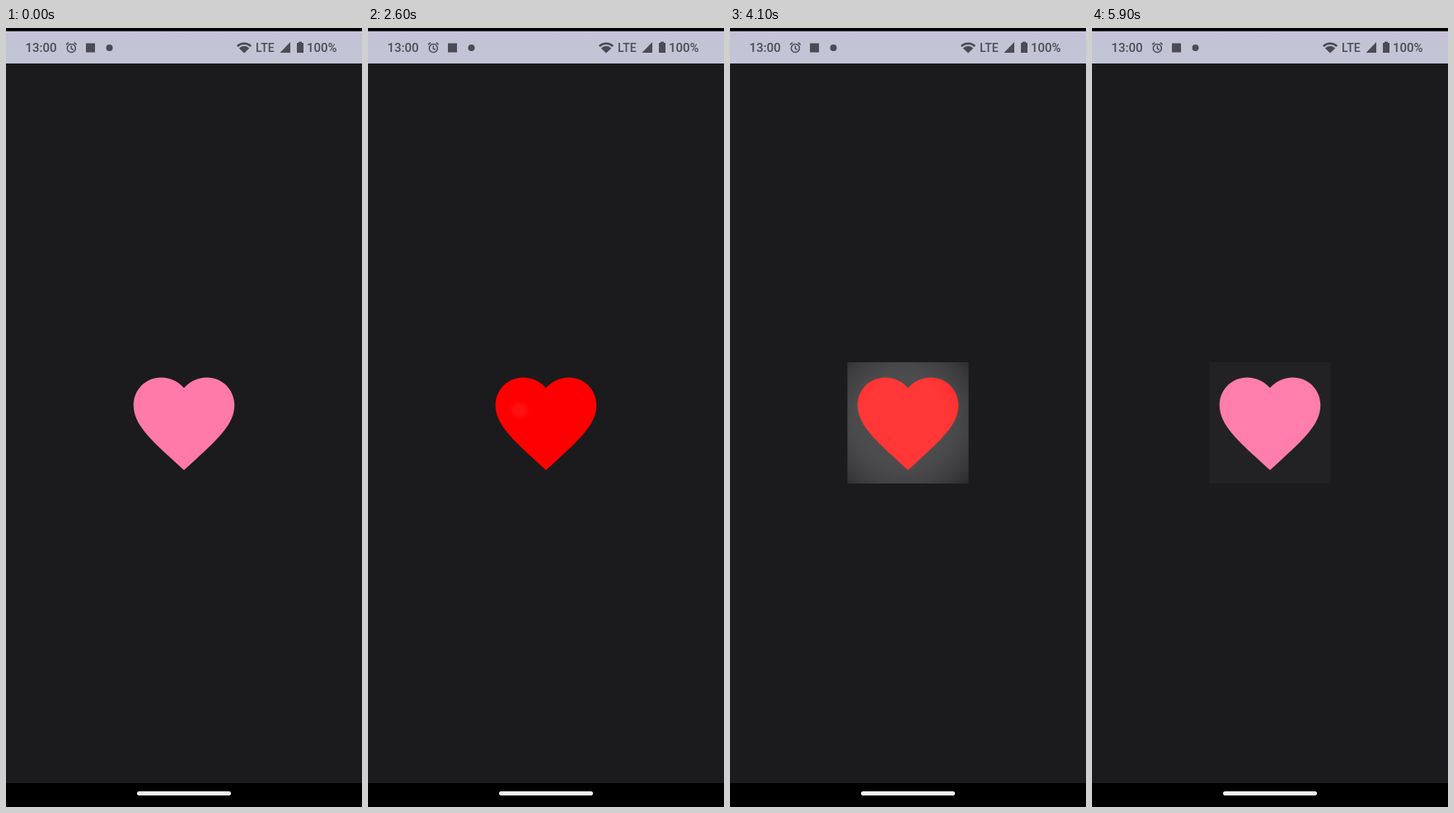
Recreate the animation shown at these times as an HTML page with a canvas. Size 432 by 944 pixels, loop 6000 ms.

```html
<!DOCTYPE html>
<html lang="en">
<head>
<meta charset="utf-8">
<title>Heart toggle</title>
<style>
  html, body { margin: 0; width: 100%; height: 100%; overflow: hidden; background: #000; }
  canvas { display: block; }
</style>
</head>
<body>
<canvas id="stage" width="432" height="944"></canvas>
<script>
const ctx = document.getElementById('stage').getContext('2d');
const LOOP = 6000, STEP = 100;
const PINK = '#ff7aa8', RED = '#ff0000', INK = '#4c4a55';

const BOX = { x: 142.5, y: 405, size: 147 };
const CENTER = { x: 216, y: 478.5 };
const ENTER = 450, EXIT = 375, RELEASE = 100;
const MAX_RADIUS = 240, MAX_ALPHA = 0.22;

const heart = new Path2D('M12 21.35l-1.45-1.32C5.4 15.36 2 12.28 2 8.5 2 5.42 4.42 3 7.5 3c1.74 0 3.41.81 4.5 2.09C13.09 3.81 14.76 3 16.5 3 19.58 3 22 5.42 22 8.5c0 3.78-3.4 6.86-8.55 11.54L12 21.35z');

const taps = [
  { time: 1062, x: 185, y: 462, color: RED },
  { time: 2528, x: 181, y: 462, color: PINK },
  { time: 3855, x: 185, y: 462, color: RED },
  { time: 5142, x: 187, y: 461, color: PINK },
];

const clamp = v => Math.min(1, Math.max(0, v));
const mix = (a, b, k) => a + (b - a) * k;

// Fast-out-slow-in: cubic-bezier(.4, 0, .2, 1)
function ease(x) {
  let lo = 0, hi = 1;
  for (let i = 0; i < 20; i++) {
    const s = (lo + hi) / 2, r = 1 - s;
    if (1.2 * r * r * s + 0.6 * r * s * s + s * s * s < x) lo = s; else hi = s;
  }
  return 3 * (1 - lo) * lo * lo + lo ** 3;
}

function rect(x, y, w, h, fill) {
  ctx.fillStyle = fill;
  ctx.fillRect(x, y, w, h);
}

function disc(x, y, r) {
  ctx.beginPath();
  ctx.arc(x, y, r, 0, 7);
  ctx.fill();
}

function lines(...paths) {
  ctx.beginPath();
  for (const [x, y, ...rest] of paths) {
    ctx.moveTo(x, y);
    for (let i = 0; i < rest.length; i += 2) ctx.lineTo(rest[i], rest[i + 1]);
  }
}

function label(text, x, size) {
  ctx.font = `500 ${size}px Roboto, sans-serif`;
  ctx.fillText(text, x, 28.7);
}

function drawStatusBar() {
  const tint = ctx.createLinearGradient(0, 4, 0, 43);
  tint.addColorStop(0, '#c8c0dc');
  tint.addColorStop(0.3, '#c3c3d6');
  tint.addColorStop(1, '#c2c5d5');
  rect(0, 4, 432, 39, tint);

  ctx.fillStyle = ctx.strokeStyle = INK;
  label('13:00', 23.5, 15);
  label('LTE', 303, 14);
  label('100%', 365, 15);

  // Alarm clock
  ctx.lineWidth = 1.5;
  ctx.beginPath();
  ctx.arc(79.3, 24.5, 5, 0, 7);
  ctx.stroke();
  lines([79.3, 21.5, 79.3, 25, 81.7, 26.3], [73, 20.2, 76, 17.7], [82.6, 17.7, 85.6, 20.2]);
  ctx.stroke();

  // Notification markers
  ctx.fillRect(97, 18.5, 11, 11);
  disc(125.5, 24, 4);

  // Wi-Fi
  const from = -Math.PI * 0.75, to = -Math.PI * 0.25;
  ctx.lineWidth = 2.6;
  ctx.beginPath();
  ctx.arc(289, 30.3, 11.6, from, to);
  ctx.stroke();
  ctx.beginPath();
  ctx.moveTo(289, 30.6);
  ctx.arc(289, 30.6, 8.8, from, to);
  ctx.fill();

  // Signal and battery
  lines([332.5, 30, 345, 30, 345, 17]);
  ctx.fill();
  ctx.fillRect(353, 18, 8, 12);
  ctx.fillRect(355, 16.6, 4, 2);
}

function drawHeart(color) {
  ctx.save();
  ctx.translate(BOX.x, BOX.y);
  ctx.scale(BOX.size / 24, BOX.size / 24);
  ctx.fillStyle = color;
  ctx.fill(heart);
  ctx.restore();
}

function drawRipple(tap, age) {
  if (age <= 0 || age >= ENTER + EXIT) return;
  const progress = age < ENTER
    ? ease(age / ENTER) / 2
    : 0.5 + (age - ENTER) / EXIT / 2;
  const fade = Math.min(clamp(progress / 0.13), 1 - clamp((progress - 0.4) / 0.6));
  const shift = clamp(progress * 2);
  const x = mix(tap.x, CENTER.x, shift), y = mix(tap.y, CENTER.y, shift);
  const radius = MAX_RADIUS * progress;

  // Soft edge: smoothstep falloff between half and one and a half radii
  const glow = ctx.createRadialGradient(x, y, radius / 2, x, y, radius * 1.5);
  for (let i = 0; i <= 8; i++) {
    const k = i / 8, falloff = 1 - k * k * (3 - 2 * k);
    glow.addColorStop(k, `rgba(255,255,255,${(MAX_ALPHA * fade * falloff).toFixed(4)})`);
  }
  rect(BOX.x, BOX.y, BOX.size, BOX.size, glow);
}

function draw(time) {
  rect(0, 0, 432, 944, '#000');
  rect(0, 43, 432, 872, '#1b1b1d');
  drawStatusBar();

  let color = PINK;
  for (const tap of taps) if (time >= tap.time + RELEASE) color = tap.color;
  drawHeart(color);
  for (const tap of taps) drawRipple(tap, time < tap.time + 38 ? 0 : time - tap.time);

  ctx.fillStyle = '#f1f1f1';
  ctx.beginPath();
  ctx.roundRect(159, 925, 114, 5, 2.5);
  ctx.fill();
}

const start = performance.now();
function tick() {
  const time = (performance.now() - start) % LOOP;
  draw(Math.floor(time / STEP) * STEP);
  requestAnimationFrame(tick);
}
tick();
</script>
</body>
</html>
```
